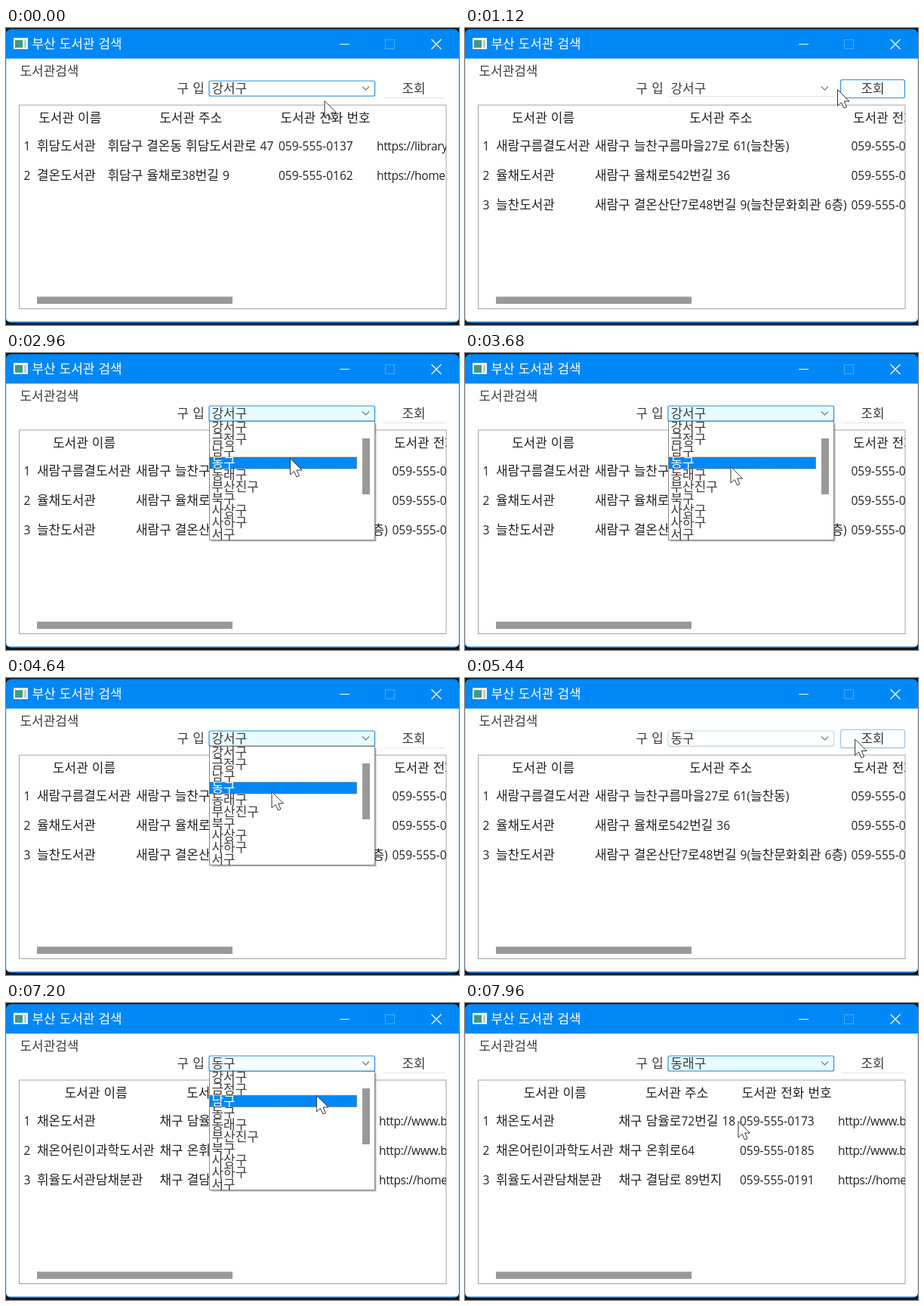
Animation of 600 by 393 pixels, one loop 8000 ms. Source, as an HTML page:

```html
<!DOCTYPE html>
<html lang="ko">
<head>
<meta charset="utf-8">
<title>부산 도서관 검색</title>
<style>
  html, body { margin: 0; width: 100%; height: 100%; overflow: hidden; background: #15171a; }
  svg { display: block; width: 600px; height: 393px; }
  text { white-space: pre; fill: #222; }
  .ko { font: 16.95px "Noto Sans CJK KR", "Noto Sans CJK", sans-serif; }
  .la { font: 15.5px "Open Sans", "Noto Sans", sans-serif; word-spacing: 1px; }
  .thin { fill: #3c3c3c; }
  .thin .ko { font-weight: 300; }
  .url .la { letter-spacing: -.35px; }
  .mid { text-anchor: middle; }
  .white { fill: #fff; }
</style>
</head>
<body>
<svg viewBox="0 0 600 393" xmlns="http://www.w3.org/2000/svg">
  <defs>
    <clipPath id="view"><rect x="18" y="102" width="565" height="269"/></clipPath>
    <clipPath id="frame"><rect y="1.5" width="600" height="388.5" rx="7"/></clipPath>
  </defs>

  <g clip-path="url(#frame)">
    <rect width="600" height="393" fill="#0088f7"/>
    <rect y="40.5" width="600" height="348" fill="#fff"/>
    <rect x=".5" y="2" width="599" height="387.2" rx="7" fill="none" stroke="#0088f7" stroke-opacity=".25"/>
  </g>
  <rect x="10" y="13" width="19" height="15" fill="#f4f8f8"/>
  <rect x="12" y="16" width="10" height="10" fill="#3f9a86"/>
  <rect x="24" y="16" width="3" height="10" fill="#b9cfd4"/>
  <g fill="none" stroke="#fff" stroke-width="1.2">
    <path d="M442 21.5H455M563.5 15L576.5 28M576.5 15L563.5 28"/>
    <rect x="502.5" y="15.5" width="12" height="12" opacity=".25"/>
  </g>

  <path d="M270 90.5H488M500 92.5H581" stroke="#e3e3e3"/>
  <rect id="tint" x="269" y="70" width="219" height="20" rx="2" fill="#e6fcff"/>
  <rect id="edge" x="269" y="70" width="219.5" height="20" rx="2" fill="none" stroke="#2b8fdc" stroke-width="1.2"/>
  <path d="M472 77.5L476.5 82L481 77.5" fill="none" stroke="#777" stroke-width="1.1"/>
  <rect id="button" x="497.5" y="68.5" width="85" height="24" rx="2.5" fill="#fbfeff" stroke="#2b8fdc" stroke-width="1.2"/>

  <rect x="17.5" y="102" width="565.5" height="269.5" fill="none" stroke="#a3a3a3"/>
  <g id="tables" clip-path="url(#view)"></g>
  <rect x="41" y="355.5" width="259" height="9.5" fill="#999"/>
  <g id="labels"></g>

  <g id="popup">
    <rect x="272" y="93" width="218.5" height="156.5" fill="#000" opacity=".28"/>
    <rect x="269.5" y="90.5" width="219" height="157" fill="#fff" stroke="#858585"/>
    <rect id="mark" x="270" width="194.5" height="15.2" fill="#0088f7" stroke="#7a5a30" stroke-dasharray="1 1"/>
    <rect x="472" y="113" width="10" height="74" fill="#999"/>
  </g>
  <path id="cursor" d="M0 0V21.5L5 17L8.5 24.5L12 23L8.6 15.5H15.5Z" fill="#fff" stroke="#333"/>
</svg>
<script>
const NS = "http://www.w3.org/2000/svg";
const LOOP = 8000, ROW = 15.7, TOP = 90.5;
const $ = id => document.getElementById(id);

function add(parent, tag, attrs = {}) {
  const el = document.createElementNS(NS, tag);
  for (const k in attrs) el.setAttribute(k, attrs[k]);
  return parent.appendChild(el);
}

// Hangul and Latin runs use separate fonts; y is the middle of the line.
function write(parent, x, y, str, cls = "") {
  const t = add(parent, "text", { x, y: y + 6, class: cls });
  for (const run of str.match(/[가-힣]+|[^가-힣]+/g))
    add(t, "tspan", { class: /[가-힣]/.test(run) ? "ko" : "la" }).textContent = run;
  return t;
}

const labels = $("labels");
write(labels, 34.5, 21, "부산 도서관 검색", "white");
write(labels, 18.5, 57, "도서관검색", "thin");
write(labels, 226.5, 80, "구 입", "thin");
write(labels, 524.5, 80, "조회", "thin");

const districts = "강서구 금정구 남구 동구 동래구 부산진구 북구 사상구 사하구 서구".split(" ");
const picks = [0, 3, 4];
const picked = picks.map(i => write(labels, 272.5, 80, districts[i], "thin"));
const items = districts.map((d, i) => write($("popup"), 272.5, TOP + ROW * (i + .5), d, "thin"));

const heads = ["도서관 이름", "도서관 주소", "도서관 전화 번호"];

// Headers are centred in their columns, cells start at the left edge.
function sheet(nameWidth, addressWidth, rows) {
  const g = add($("tables"), "g");
  let left = 38;
  [nameWidth, addressWidth, 130, 130].forEach((width, c) => {
    if (heads[c]) write(g, left + width / 2, 119, heads[c], "mid");
    rows.forEach((row, r) => row[c] && write(g, left + 3, 156 + 39 * r, row[c], c === 3 ? "url" : ""));
    left += width;
  });
  rows.forEach((_, r) => write(g, 23.5, 156 + 39 * r, String(r + 1)));
  return g;
}

const sheets = [
  sheet(93.5, 226.5, [
    ["휘담도서관", "휘담구 결온동 휘담도서관로 47", "059-555-0137", "https://library"],
    ["결온도서관", "휘담구 율채로38번길 9", "059-555-0162", "https://home"]]),
  sheet(131, 339.5, [
    ["새람구름결도서관", "새람구 늘찬구름마을27로 61(늘찬동)", "059-555-0114"],
    ["율채도서관", "새람구 율채로542번길 36", "059-555-0128"],
    ["늘찬도서관", "새람구 결온산단7로48번길 9(늘찬문화회관 6층)", "059-555-0149"]]),
  sheet(162.5, 160.5, [
    ["채온도서관", "채구 담율로72번길 18", "059-555-0173", "http://www.b"],
    ["채온어린이과학도서관", "채구 온휘로64", "059-555-0185", "http://www.b"],
    ["휘율도서관담채분관", "채구 결담로 89번지", "059-555-0191", "https://home"]])
];

// Cursor glides: start, duration, destination
const glides = [
  [0, 450, 518, 81], [850, 550, 468, 82],
  [1650, 710, 401, 128.5], [2360, 1200, 352, 150.5],
  [4960, 560, 526, 77], [6200, 360, 468, 83.5],
  [6720, 920, 362, 156.5]
];
const clamp = u => Math.min(1, Math.max(0, u));
const smooth = u => u * u * (3 - 2 * u);

function cursorAt(t) {
  let x = 422, y = 96.5;
  for (const [start, length, toX, toY] of glides) {
    const u = smooth(clamp((t - start) / length));
    x += (toX - x) * u;
    y += (toY - y) * u;
  }
  return [x, y];
}

// Opacity that rises after each "on" time and falls after its "off" time
const glow = (t, rise, fall, ...spans) => Math.max(...spans.map(([on, off]) =>
  Math.min(clamp((t - on) / rise), clamp(1 - (t - off) / fall))));

const show = (el, on) => el.setAttribute("display", on ? "inline" : "none");
const fade = (id, v) => $(id).setAttribute("opacity", v);
const opens = [[1760, 4960], [6720, 7960]];

function draw(t) {
  const [x, y] = cursorAt(t);
  $("cursor").setAttribute("transform", `translate(${x} ${y})`);

  fade("edge", glow(t, 250, 700, [-400, 0], [1400, 4960], [6380, LOOP]));
  fade("tint", glow(t, 1300, 300, ...opens));
  fade("button", glow(t, 200, 250, [340, 1120], [5340, 6300]));

  const table = t < 640 ? 0 : t < 5880 ? 1 : 2;
  const choice = opens.filter(([, close]) => t >= close).length;
  sheets.forEach((g, i) => show(g, i === table));
  picked.forEach((p, i) => show(p, i === choice));

  show($("popup"), opens.some(([open, close]) => t >= open && t < close));
  const row = y > TOP ? Math.floor((y - TOP) / ROW) : picks[choice];
  $("mark").setAttribute("y", TOP + ROW * row + .3);
  items.forEach((el, i) => el.setAttribute("class", i === row ? "white" : "thin"));
}

const start = performance.now();
function tick() {
  draw((performance.now() - start) % LOOP);
  requestAnimationFrame(tick);
}
tick();
</script>
</body>
</html>
```
